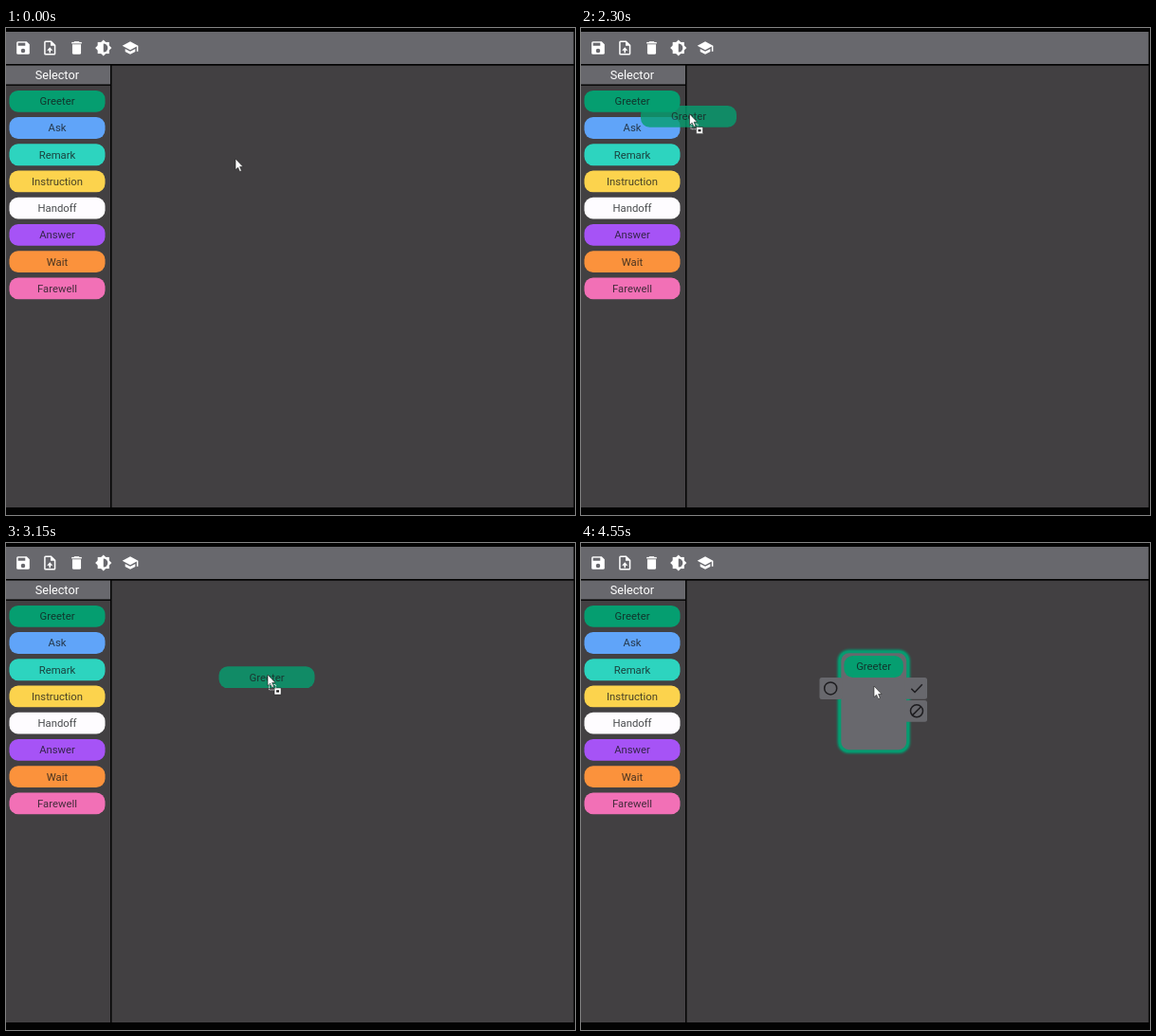
These frames come from a looping animation (600 by 514 pixels, 5850 ms). An HTML page:

```html
<!DOCTYPE html>
<html lang="en">
<head>
<meta charset="utf-8">
<title>Drag a block onto the canvas</title>
<style>
  html, body { margin: 0; width: 100%; height: 100%; overflow: hidden; background: #000; }
  svg { display: block; width: 100vw; height: 100vh; }
  text { font-family: Roboto, Arial, sans-serif; text-anchor: middle; }
  .panel { fill: #68686d; }
  .canvas { fill: #424042; }
</style>
</head>
<body>
<svg viewBox="0 0 600 514" xmlns="http://www.w3.org/2000/svg">
  <defs>
    <filter id="soft" x="-20%" y="-20%" width="140%" height="140%"><feGaussianBlur stdDeviation="0.8"/></filter>
  </defs>
  <rect width="600" height="514" fill="#030303"/>
  <rect class="panel" y="4" width="598.5" height="34"/>
  <rect class="canvas" y="39.7" width="110" height="466.3"/>
  <rect class="canvas" x="111.5" y="39.7" width="487" height="466.3"/>
  <rect class="panel" y="39.7" width="110" height="19.8"/>
  <rect y="59.5" width="110" height="1.5" fill="#0b0b0b"/>
  <text x="53.8" y="53.6" font-size="12.7" fill="#fff">Selector</text>

  <!-- Toolbar icons, each drawn in a 24 unit box -->
  <g id="icons" fill="#fff">
    <g>
      <path d="M17 3H5Q3 3 3 5V19Q3 21 5 21H19Q21 21 21 19V7Z"/>
      <rect class="panel" x="5" y="5" width="10" height="4"/>
      <circle class="panel" cx="12" cy="16" r="3"/>
    </g>
    <g>
      <path d="M14 2H6Q4 2 4 4V20Q4 22 6 22H18Q20 22 20 20V8Z"/>
      <path class="panel" d="M6 4H13V9H18V20H6Z"/>
      <path d="M8 15.5L12 11L16 15.5H13V19H11V15.5Z"/>
    </g>
    <g>
      <path d="M6 7H18V19Q18 21 16 21H8Q6 21 6 19Z"/>
      <rect x="5" y="4" width="14" height="2"/>
      <rect x="8.5" y="3" width="7" height="2"/>
    </g>
    <g>
      <rect x="4" y="4" width="16" height="16"/>
      <rect x="4" y="4" width="16" height="16" transform="rotate(45 12 12)"/>
      <path class="panel" d="M12 6A6 6 0 0 1 12 18Z"/>
    </g>
    <g>
      <path d="M12 3L1 9L12 15L21 10V17H23V9Z"/>
      <path d="M5 13.2V17.2L12 21L19 17.2V13.2L12 17Z"/>
    </g>
  </g>
  <g id="blocks"></g>

  <g id="node">
    <rect x="272.5" y="114.5" width="72.5" height="105.5" rx="10" class="panel" stroke="#069b70" stroke-width="4" filter="url(#soft)"/>
    <rect x="273" y="115" width="71.5" height="104.5" rx="9.5" class="panel" stroke="#069b70" stroke-width="2.6"/>
    <g id="nodeTitle" transform="translate(308.6 130.5)"></g>
    <rect class="panel" x="251.5" y="142" width="24" height="23" rx="2.5"/>
    <rect class="panel" x="341.5" y="142" width="23.5" height="22.7" rx="2.5"/>
    <rect class="panel" x="341.5" y="166" width="23.5" height="22.7" rx="2.5"/>
    <g fill="none" stroke="#1d1c1f" stroke-width="1.5">
      <circle cx="263.2" cy="153.4" r="6.5"/>
      <path d="M348.3 153.8l3.7 3.7 7.8-8.3"/>
      <circle cx="354" cy="177.3" r="6.5"/>
      <path d="M349.4 181.9l9.2-9.2"/>
    </g>
  </g>

  <g id="ghost" opacity=".8"></g>
  <g id="cursor">
    <g id="badge">
      <rect x="1.5" y="10.5" width="7" height="5.5" fill="none" stroke="#e4e4e4" stroke-width=".9" stroke-dasharray="1.6 .8"/>
      <rect x="7" y="14" width="7" height="7" fill="#fff" stroke="#222" stroke-width=".5"/>
      <rect x="9" y="16.3" width="3" height="2.3" fill="#222"/>
    </g>
    <path d="M0 0V11.6L2.6 9.2 4.5 13.5 6.4 12.7 4.6 8.5H8Z" fill="#fff" stroke="#222" stroke-width=".6"/>
  </g>
</svg>
<script>
const LOOP = 5850, STEP = 50;
const DRAG_START = 2000, DROP = 3850, NODE_IN = 4400, NODE_FADE = 150;
const $ = id => document.getElementById(id);

const blocks = {
  Greeter: '#059e70', Ask: '#60a4f9', Remark: '#2dd4bf', Instruction: '#fcd34d',
  Handoff: '#fefcff', Answer: '#a653f6', Wait: '#fb923c', Farewell: '#f270b6'
};

// A rounded block centred on the local origin.
const pill = (label, width = 101) =>
  `<rect x="${-width / 2}" y="-11.4" width="${width}" height="22.8" rx="9.3" fill="${blocks[label]}"/>
   <text y="3.9" font-size="11.3" fill="#15181a" fill-opacity=".78">${label}</text>`;

$('blocks').innerHTML = Object.keys(blocks).map((label, i) =>
  `<g transform="translate(54 ${77.3 + i * 28.22})">${pill(label)}</g>`).join('');
$('ghost').innerHTML = pill('Greeter');
$('nodeTitle').innerHTML = pill('Greeter', 62.5);
[...$('icons').children].forEach((icon, i) =>
  icon.setAttribute('transform', `translate(${18 + i * 28.25} 21) scale(.76) translate(-12 -12)`));

const linear = k => k;
const smooth = k => k * k * (3 - 2 * k);
const easeOut = k => 1 - (1 - k) ** 1.6;

// Where the pointer arrives, when, and how it gets there.
const stops = [
  { at: 200, x: 242, y: 138 },
  { at: 650, x: 53, y: 92, ease: smooth },
  { at: 850, x: 95, y: 99, ease: smooth },
  { at: 1250, x: 41, y: 68, ease: linear },
  { at: 1400, x: 55, y: 74, ease: smooth },
  { at: 1950, x: 55, y: 74, ease: linear },
  { at: 2550, x: 157, y: 102.7, ease: linear },
  { at: 3150, x: 276, y: 139, ease: linear },
  { at: 3500, x: 309, y: 151, ease: easeOut }
];

function pointerAt(t) {
  const first = stops[0], last = stops[stops.length - 1];
  const time = Math.min(Math.max(t, first.at), last.at);
  const i = Math.max(1, stops.findIndex(stop => stop.at >= time));
  const from = stops[i - 1], to = stops[i];
  const k = to.ease((time - from.at) / (to.at - from.at));
  return [from.x + (to.x - from.x) * k, from.y + (to.y - from.y) * k];
}

const place = (id, x, y) => $(id).setAttribute('transform', `translate(${x} ${y})`);
const show = (id, on) => $(id).setAttribute('visibility', on ? 'visible' : 'hidden');

function render(time) {
  const t = Math.floor((time % LOOP) / STEP) * STEP;
  const [x, y] = pointerAt(t);
  const dragging = t >= DRAG_START && t < DROP;
  place('cursor', x, y);
  place('ghost', x - 1, y + 2.7);
  show('ghost', dragging);
  show('badge', dragging);
  show('node', t >= NODE_IN);
  $('node').setAttribute('opacity', Math.min(1, 0.55 + 0.45 * (t - NODE_IN) / NODE_FADE));
}

let start;
function tick(now) {
  start ??= now;
  render(now - start);
  requestAnimationFrame(tick);
}
render(0);
requestAnimationFrame(tick);
</script>
</body>
</html>
```
